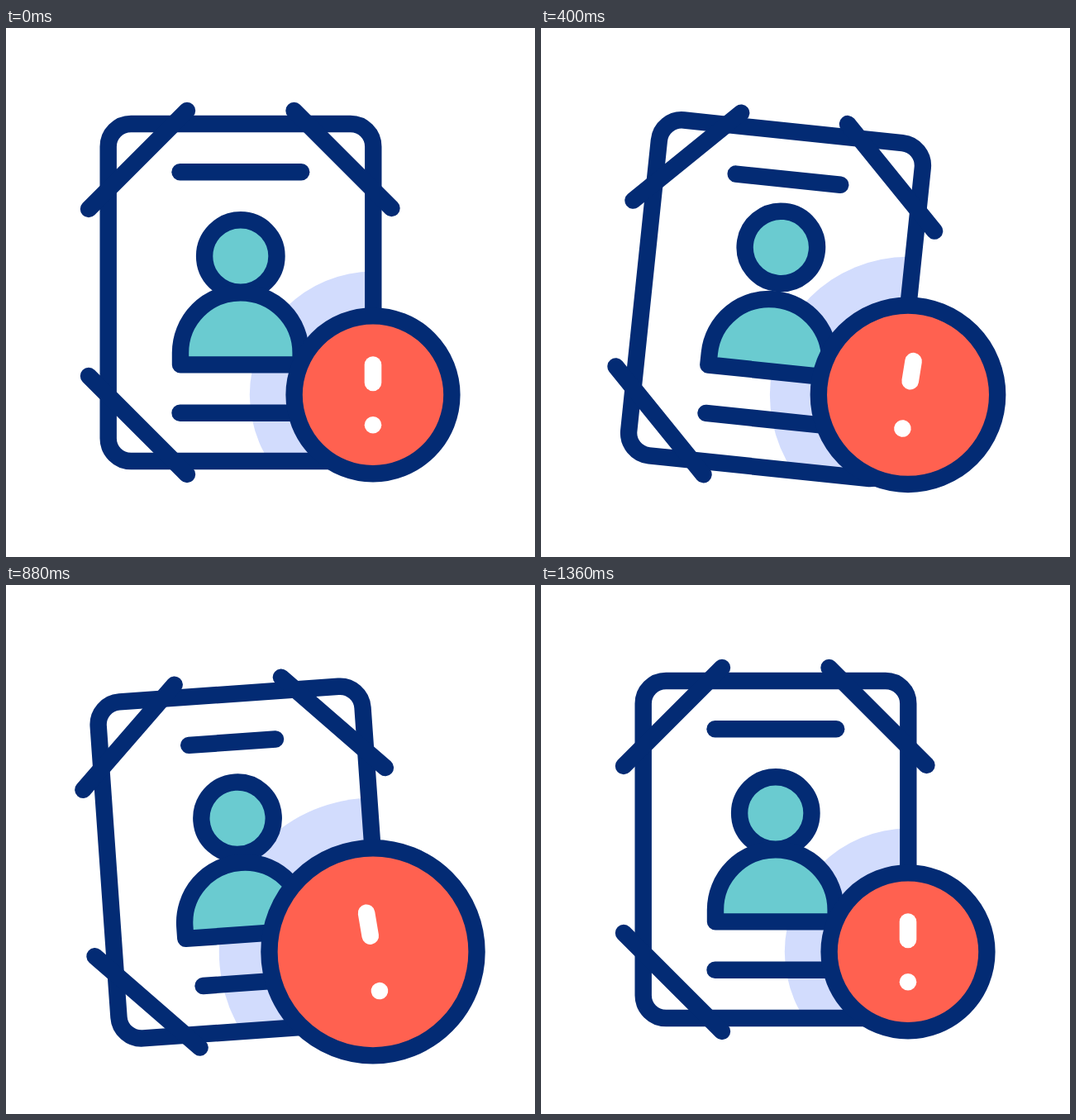
Recreate the animation shown at these times as an HTML page. Size 640 by 640 pixels, loop 1.4 s.

```html
<!DOCTYPE html>
<html lang="en">
<head>
<meta charset="utf-8">
<title>Profile alert</title>
<style>
  html, body { margin: 0; width: 100%; height: 100%; overflow: hidden; background: #fff; }
  svg { display: block; width: 100%; height: 100%; }
  .ink { stroke: #032b74; stroke-width: 20.4; stroke-linecap: round; stroke-linejoin: round; fill: none; }
  .teal { fill: #6acbd0; }
  .alert { fill: #ff6150; }
  .mark { stroke: #fff; stroke-width: 20.6; stroke-linecap: round; }
</style>
</head>
<body>
<svg viewBox="0 0 640 640">
  <defs>
    <clipPath id="inside">
      <rect id="clipCard" x="-160.3" y="-204" width="320.6" height="408" rx="27.5"/>
    </clipPath>
  </defs>
  <g clip-path="url(#inside)">
    <circle id="halo" cx="444" cy="443.8" fill="#d2dcfd"/>
  </g>
  <!-- card coordinates are measured from its centre -->
  <g id="card" class="ink">
    <rect x="-160.3" y="-204" width="320.6" height="408" rx="27.5"/>
    <path d="M-65 -220L-184 -101M64.5 -220L182.5 -102M-184 101L-65 220"/>
    <path id="topBar"/>
    <path id="lowBar"/>
    <circle id="head" class="teal" cx="-.2" r="43.7"/>
    <path class="teal" d="M-73 87.4V73A72.8 72.8 0 0 1 72.6 73V87.4Z"/>
  </g>
  <g transform="translate(444 443.8)">
    <circle id="badge" class="ink alert"/>
    <g id="mark" class="mark">
      <path id="stem"/>
      <path id="dot"/>
    </g>
  </g>
</svg>
<script>
  const LOOP = 1400, STEP = 40, RADIUS = 95.4;
  const el = id => document.getElementById(id);
  const set = (id, name, value) => el(id).setAttribute(name, value);

  // cubic-bezier(.42, 0, .58, 1)
  function ease(x) {
    let lo = 0, hi = 1, u = .5;
    for (let i = 0; i < 24; i++) {
      u = (lo + hi) / 2;
      if (1.26 * u - .78 * u * u + .52 * u ** 3 < x) lo = u; else hi = u;
    }
    return u * u * (3 - 2 * u);
  }

  // keys: [time, value] pairs, eased between neighbours
  const track = (...keys) => t => {
    if (t <= keys[0][0]) return keys[0][1];
    for (let i = 1; i < keys.length; i++) {
      const [t0, a] = keys[i - 1], [t1, b] = keys[i];
      if (t <= t1) return a + (b - a) * ease((t - t0) / (t1 - t0));
    }
    return keys[keys.length - 1][1];
  };
  const pulse = (start, full, fall, end, size) =>
    track([start, 0], [full, size], [fall, size], [end, 0]);

  const tilt = track([88, 0], [430, 6.05], [850, -4.1], [1160, 0]);
  const drop = pulse(168, 666, 775, 1157, 18.5);
  const lift = pulse(75, 570, 660, 1045, 25.3);
  const glow = pulse(170, 692, 745, 1207, 45);
  const trimTop = pulse(175, 692, 745, 1220, 25);
  const trimLow = pulse(240, 760, 775, 1345, 19);
  const grow = pulse(180, 716, 724, 1260, 36.6);
  const shake = track([180, 0], [480, 10.8], [960, -10.8], [1200, 0]);

  const bar = (trim, y) => `M${trim - 73.5} ${y}H${73.2 - trim}`;

  function draw(t) {
    const pose = `translate(284 ${320 + drop(t)}) rotate(${tilt(t)})`;
    set('card', 'transform', pose);
    set('clipCard', 'transform', pose);
    set('halo', 'r', 149.2 + glow(t));
    set('topBar', 'd', bar(trimTop(t), -145.8));
    set('lowBar', 'd', bar(trimLow(t), 145.8));
    set('head', 'cy', -44 - lift(t));

    const r = RADIUS + grow(t), k = r / RADIUS;
    set('badge', 'r', r);
    set('mark', 'transform', `rotate(${shake(t)})`);
    set('stem', 'd', `M0 ${-36.3 * k}V${-14.8 * k}`);
    set('dot', 'd', `M0 ${36.4 * k}h.01`);
  }

  const begin = performance.now();
  function tick() {
    const t = (performance.now() - begin) % LOOP;
    draw(Math.floor(t / STEP) * STEP);
    requestAnimationFrame(tick);
  }
  tick();
</script>
</body>
</html>
```
